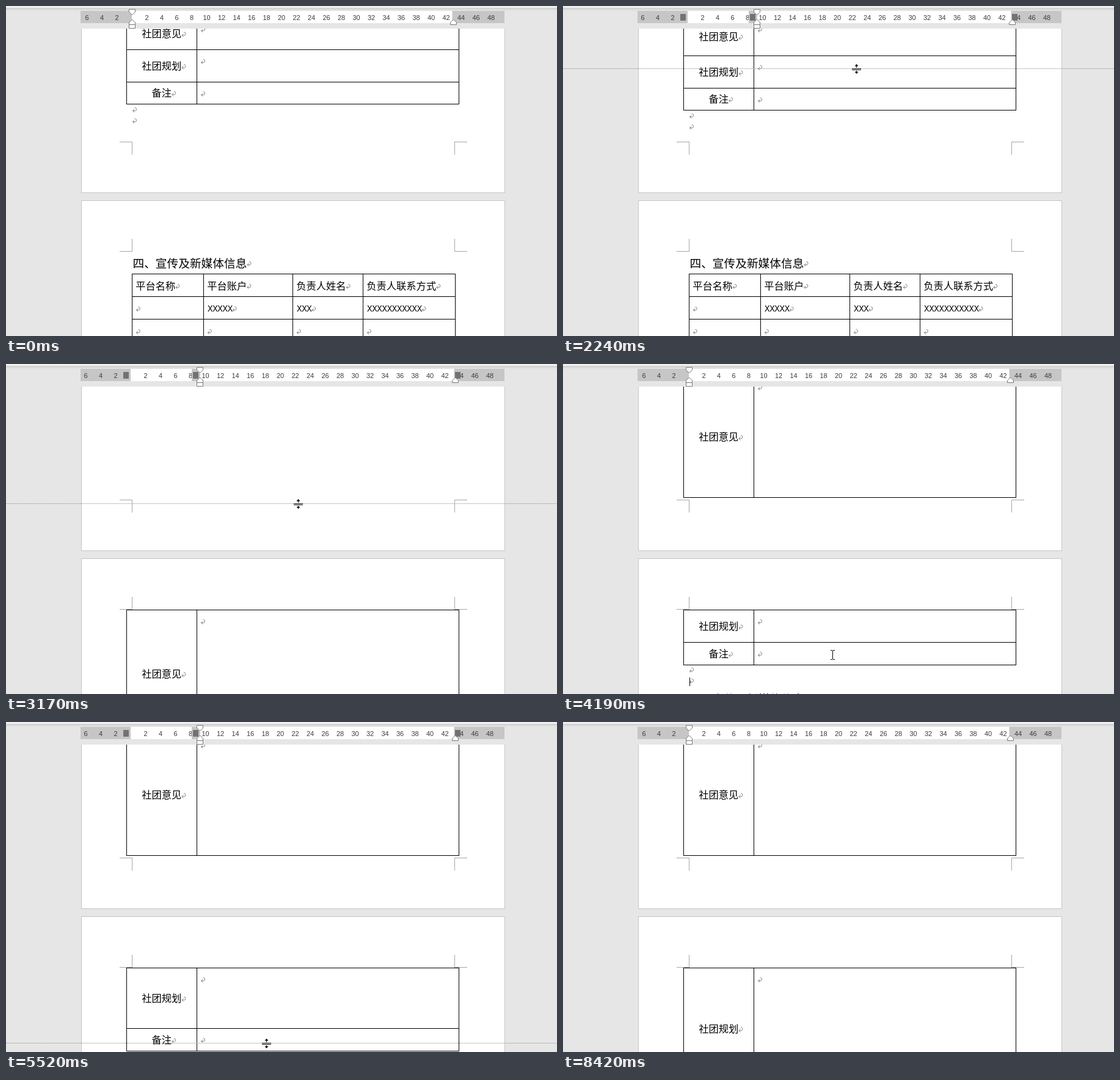
These frames come from a looping animation (902x540 px, 9010 ms). An HTML page:

```html
<!DOCTYPE html>
<html lang="zh-CN">
<head>
<meta charset="utf-8">
<title>表格行高调整</title>
<style>
  html, body { margin: 0; width: 100%; height: 100%; overflow: hidden; background: #e6e6e6; }
  svg { display: block; width: 100%; height: 100%; }
  text { font-family: "Noto Sans CJK SC", "Noto Sans CJK", sans-serif; }
  .cell { font-size: 16.3px; font-weight: 300; }
  .title { font-size: 18.7px; }
  .mono { font: 300 15px "Noto Sans Mono", "Liberation Mono", monospace; letter-spacing: -.84px; }
  .num { font: 11px "Liberation Sans", Arial, sans-serif; fill: #3c3c3c; text-anchor: middle; }
  .border { fill: none; stroke: #000; shape-rendering: crispEdges; }
  .corner { fill: none; stroke: #a6a6a6; shape-rendering: crispEdges; }
  .page { fill: #fff; stroke: #c6c6c6; shape-rendering: crispEdges; }
  .mark { fill: none; stroke: #858585; }
  .tab { fill: #fff; stroke: #777; }
  .gray { fill: #c6c6c6; }
  .white { fill: #fff; }
</style>
</head>
<body>
<svg viewBox="0 0 902 540">
  <defs>
    <linearGradient id="shade" x2="0" y2="1">
      <stop offset="0" stop-color="#cecece"/><stop offset="1" stop-color="#e6e6e6"/>
    </linearGradient>
    <pattern id="mesh" width="2" height="2" patternUnits="userSpaceOnUse">
      <path d="M0 0H2V2H0Z" fill="#999"/><path d="M0 0H1V1H0ZM1 1H2V2H1Z" fill="#4c4c4c"/>
    </pattern>
  </defs>
  <rect width="902" height="540" fill="#e6e6e6"/>
  <rect class="page" x="123.5" y="20.5" width="693" height="285"/>
  <rect class="page" x="123.5" y="318.5" width="693" height="260"/>
  <path class="corner" d="M186 222.5H206.5V243M755 222.5H734.5V243M186 401.5H206.5V381M755 401.5H734.5V381"/>
  <g id="doc"></g>
  <rect id="handle" x="742.5" y="161.5" width="9" height="9" fill="#fff" stroke="#999"/>
  <rect id="caret" x="207" width="1" height="14"/>
  <path id="guide" d="M0 .5H902" stroke="#8c8c8c" stroke-dasharray="1 1"/>
  <path id="beam" d="M-3 -7.5H0M1 -7.5H4M-3 7.5H0M1 7.5H4M.5 -7V7" class="border"/>
  <g id="sizer">
    <path d="M-7 -1H8V0H-7ZM-7 1H8V2H-7ZM0 -5H1V-2H0ZM0 3H1V6H0Z" shape-rendering="crispEdges"/>
    <path d="M.5 -8L3.5 -4.5H-2.5ZM.5 8L3.5 4.5H-2.5Z"/>
  </g>
  <rect width="902" height="37" fill="#e6e6e6"/>
  <rect width="902" height="3" fill="#f1f1f1"/>
  <rect y="3" width="902" height="5" fill="url(#shade)"/>
  <g id="plain"></g>
  <g id="celled"></g>
</svg>
<script>
const $ = id => document.getElementById(id);

function add(parent, tag, attrs, content) {
  const el = document.createElementNS('http://www.w3.org/2000/svg', tag);
  for (const k in attrs) el.setAttribute(k, attrs[k]);
  if (content) el.textContent = content;
  return parent.appendChild(el);
}
const group = parent => add(parent, 'g', {});
const move = (el, x, y) => el.setAttribute('transform', `translate(${x} ${y})`);
const show = (el, on) => el.setAttribute('visibility', on ? 'visible' : 'hidden');
const clamp = (v, lo, hi) => Math.min(hi, Math.max(lo, v));

// Paragraph mark; x is its left edge, y its middle.
function mark(parent, x, y) {
  const el = add(parent, 'path', { class: 'mark',
    d: 'M.5 1.5H4.5Q6.5 1.5 6.5 -1Q6.5 -3.5 4.5 -3.5H3.5M3 -1L.5 1.5L3 4' });
  move(el, x, y);
}
// Text centred on y, followed by a mark.
function line(parent, x, y, str, cls, advance, drop) {
  if (str) add(parent, 'text', { x, y: y + drop, class: cls }, str);
  mark(parent, x + str.length * advance, y + 1.5);
}
const cell = (parent, x, y, str) => line(parent, x, y, str, 'cell', 16.3, 6.2);
const code = (parent, x, y, str) => line(parent, x, y, str, 'mono', 8.16, 5.3);

// Rulers
function ruler(parent, zero, indent, right, cells) {
  const band = (x1, x2, cls) => add(parent, 'rect', { x: x1, y: 8, width: x2 - x1, height: 20, class: cls });
  const tab = d => add(parent, 'path', { class: 'tab', d });
  band(122, 816, 'gray');
  band(zero, right - 2, 'white');
  for (let n = -6; n <= 48; n += 2) {
    if (n) add(parent, 'text', { x: zero + n * 12.25, y: 23, class: 'num' }, String(Math.abs(n)));
  }
  if (cells) {
    band(304, 318, 'gray');
    for (const x of [192, 306, 735]) {
      add(parent, 'rect', { x, y: 13, width: 9, height: 11, fill: 'url(#mesh)' });
    }
  }
  const a = indent - 5, b = indent + 5;
  tab(`M${a} 5.5H${b}V10L${indent} 14.5L${a} 10Z`);
  tab(`M${a} 30.5V27L${indent} 22L${b} 27V30.5ZM${a} 30.5H${b}V36.5H${a}Z`);
  tab(`M${right - 5} 30.5V27L${right} 22L${right + 5} 27V30.5Z`);
}
ruler($('plain'), 206, 206.5, 732.5, false);
ruler($('celled'), 204, 317.5, 735.5, true);

// Document content
const doc = $('doc');
const rows = ['社团意见', '社团规划', '备注'].map(str => {
  const g = group(doc), label = group(g);
  cell(label, 254.8 - str.length * 8.15, 0, str);
  mark(g, 319, 20);
  return { g, label, frame: add(g, 'path', { class: 'border' }) };
});
const paras = [0, 1].map(() => {
  const g = group(doc);
  mark(g, 207, 0);
  return g;
});
const section = group(doc);
line(section, 207.5, 18.5, '四、宣传及新媒体信息', 'title', 18.7, 7.1);
const grid = group(section);
move(grid, 0, 36);
const cols = [206, 323, 469, 584];
const heads = ['平台名称', '平台账户', '负责人姓名', '负责人联系方式'];
cols.forEach((x, i) => {
  cell(grid, x + 6.2, 19.5, heads[i]);
  code(grid, x + 6.8, 56.5, 'X'.repeat([0, 5, 3, 11][i]));
  mark(grid, x + 6.8, 95);
});
add(grid, 'path', { class: 'border',
  d: [0, 37, 74, 111].map(y => `M206 ${y + .5}H736`).join('') +
     [...cols, 735].map(x => `M${x + .5} 0V111`).join('') });

// Timing: key points of the pointer as [ms, x, y]
const LOOP = 9010, STEP = 80, LAG = 110;
const DRAG1 = [2080, 3810], DRAG2 = [5280, 7230];
const keys = [
  [0, 600, 604], [379, 600, 604], [380, 600, 423], [1240, 501, 66], [1530, 481, 72],
  [2080, 481, 72], [2410, 479, 136], [2520, 478, 170], [2760, 478, 229], [3100, 478, 229], [3190, 478, 219],
  [3810, 478, 219], [4190, 441, 476], [4510, 444, 454], [4740, 444, 454], [4820, 435, 457],
  [5280, 435, 457], [5410, 430, 503], [5520, 426, 526], [5680, 426, 554], [5870, 426, 554], [6110, 426, 604],
  [8239, 755, 604], [8240, 755, 538], [8330, 737, 538], [8420, 737, 604], [LOOP, 737, 604]
];

function pointer(t) {
  const i = keys.findIndex(k => k[0] > t);
  const [t0, x0, y0] = keys[i - 1], [t1, x1, y1] = keys[i];
  const p = (t - t0) / (t1 - t0);
  return { x: Math.round(x0 + (x1 - x0) * p), y: Math.round(y0 + (y1 - y0) * p) };
}
// The screen refreshes in steps counted from the latest key point.
function snap(t) {
  const t0 = keys.filter(k => k[0] <= t).pop()[0];
  return t0 + Math.floor((t - t0) / STEP) * STEP;
}
const within = (t, [a, b]) => t >= a && t < b;
// How far a dragged border has followed the pointer.
const pulled = (t, [a, b]) => pointer(clamp(t - LAG, a, b)).y - pointer(a).y;

function layout(heights) {
  let y = 19;
  const place = h => {
    if (y < 300 && y + h > 222.5) y = 402.1;
    const top = y;
    y += h;
    return top;
  };
  rows.forEach((row, i) => {
    const top = Math.floor(place(heights[i])), h = Math.floor(y) - top;
    row.bottom = top + h;
    move(row.g, 0, top);
    move(row.label, 0, Math.floor(h / 2 + .5));
    row.frame.setAttribute('d', `M197.5 .5H741.5V${h + .5}H197.5ZM312.5 0V${h}`);
  });
  let last;
  for (const p of paras) {
    last = Math.floor(place(18.4) + 9.3);
    move(p, 0, last);
  }
  $('caret').setAttribute('y', last - 6);
  move(section, 0, Math.round(place(36.2)));
}

function draw(time) {
  const t = time % LOOP, s = snap(t);
  const { x, y } = pointer(s);
  const dragging = within(t, DRAG1) || within(t, DRAG2);
  layout([52 + pulled(s, DRAG1), 53 + pulled(s, DRAG2), 36.95]);

  const sizing = dragging || rows.some(r => Math.abs(y - r.bottom) < 3);
  move($('beam'), x, y);
  move($('sizer'), x, y);
  move($('guide'), 0, y - 1);
  show($('beam'), !sizing);
  show($('sizer'), sizing);
  show($('guide'), dragging);
  show($('handle'), t < DRAG1[0] && y < 161);
  show($('plain'), !dragging);
  show($('celled'), dragging);

  // The caret blinks with short half-lit fades.
  const phase = (t + 350) % 1060;
  const light = phase % 530 < STEP ? .5 : phase < 530 ? 1 : 0;
  $('caret').setAttribute('opacity', t < 380 || dragging ? 0 : light);
}

const start = performance.now();
function tick() {
  draw(performance.now() - start);
  requestAnimationFrame(tick);
}
draw(0);
requestAnimationFrame(tick);
</script>
</body>
</html>
```
